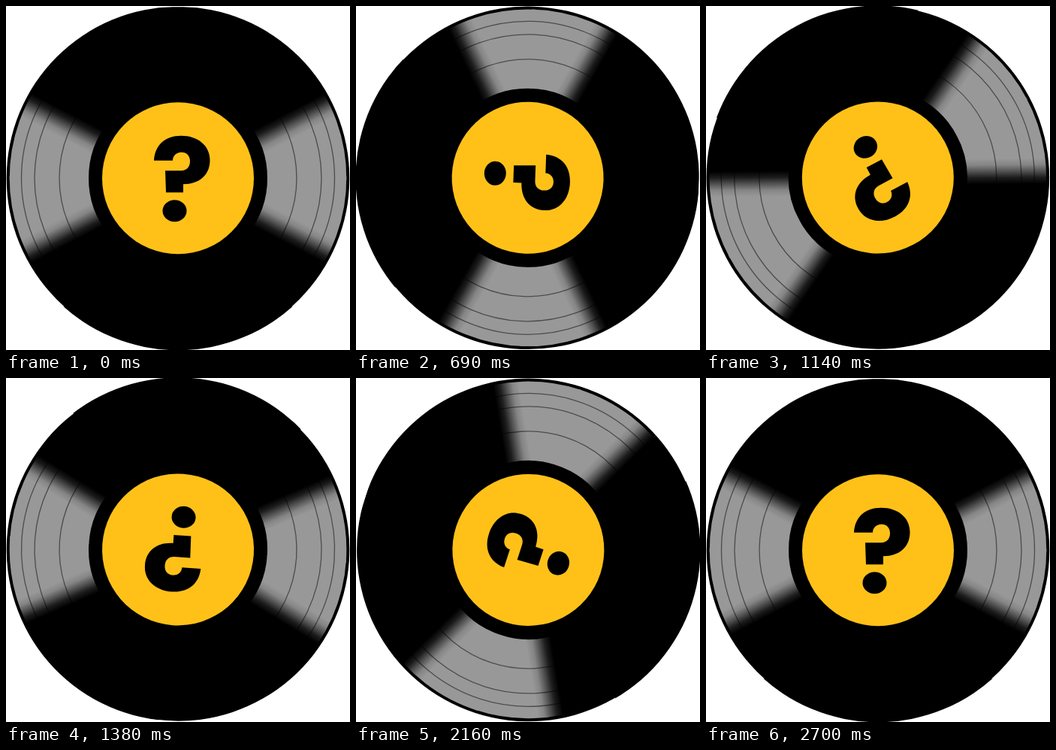
Write an HTML page with a canvas that moves like this. It is 458 px wide and 458 px high and loops after 2730 ms.

```html
<!DOCTYPE html>
<html lang="en">
<head>
<meta charset="utf-8">
<title>Spinning record</title>
<style>
  html, body { margin: 0; width: 100%; height: 100%; overflow: hidden; background: #fff; }
  canvas { display: block; }
</style>
</head>
<body>
<canvas id="stage" width="458" height="458"></canvas>
<script>
const ctx = document.getElementById('stage').getContext('2d');
const TAU = Math.PI * 2;
const STEP = 30, LOOP = 2730, DEGREES_PER_STEP = 4;

const questionMark = new Path2D(
  'M-32-23.5C-31-44-17-56.5 4-56.5C27-56.5 42.5-43 42.5-24' +
  'C42.5-4 28 8 7 8L7 19L-16 19L-17-10L4-10' +
  'C11.5-10 16-15 16-22.5C16-30 11.5-34.5 4.5-34.5C-2.5-34.5-7-29.5-7-23.5Z');
questionMark.ellipse(-4.5, 43.5, 16, 14.5, 0, 0, TAU);

// Soft edge of one quarter of the sheen; the others are mirrored.
const sheen = ctx.createLinearGradient(101, 64, 116.7, 33.8);
['#000', '#1c1c1c', '#525252', '#858585', '#989898']
  .forEach((color, i) => sheen.addColorStop(i / 4, color));

function disc(radius, color) {
  ctx.fillStyle = color;
  ctx.beginPath();
  ctx.arc(0, 0, radius, 0, TAU);
  ctx.fill();
}

function clippedDisc(radius, top, height) {
  ctx.save();
  ctx.beginPath();
  ctx.rect(-240, top, 480, height);
  ctx.clip();
  disc(radius, '#000');
  ctx.restore();
}

function drawSheen() {
  ctx.fillStyle = sheen;
  for (const sx of [-1, 1]) for (const sy of [-1, 1]) {
    ctx.save();
    ctx.scale(sx, sy);
    ctx.beginPath();
    ctx.arc(0, 0, 224.3, -0.01, 0.7);
    ctx.arc(0, 0, 119, 0.7, -0.01, true);
    ctx.fill();
    ctx.restore();
  }
}

function drawGrooves() {
  ctx.strokeStyle = 'rgba(0,0,0,.5)';
  ctx.lineWidth = 1.3;
  for (const radius of [158, 191, 208.5]) {
    ctx.beginPath();
    ctx.arc(0, 0, radius, 0, TAU);
    ctx.stroke();
  }
}

function draw(time) {
  const step = Math.floor((time % LOOP) / STEP);
  ctx.fillStyle = '#fff';
  ctx.fillRect(0, 0, 458, 458);
  ctx.save();
  // The record sits slightly below its pivot.
  ctx.translate(229, 228.8);
  ctx.rotate(step * DEGREES_PER_STEP * Math.PI / 180);
  ctx.translate(0, 0.4);
  // The rim is flat at the top and slightly wider at the bottom.
  clippedDisc(228.3, -228, 460);
  clippedDisc(229.1, 171, 70);
  drawSheen();
  drawGrooves();
  disc(101, '#ffc118');
  ctx.fillStyle = '#000';
  ctx.fill(questionMark);
  ctx.restore();
}

const start = performance.now();
function tick() {
  draw(performance.now() - start);
  requestAnimationFrame(tick);
}
tick();
</script>
</body>
</html>
```
